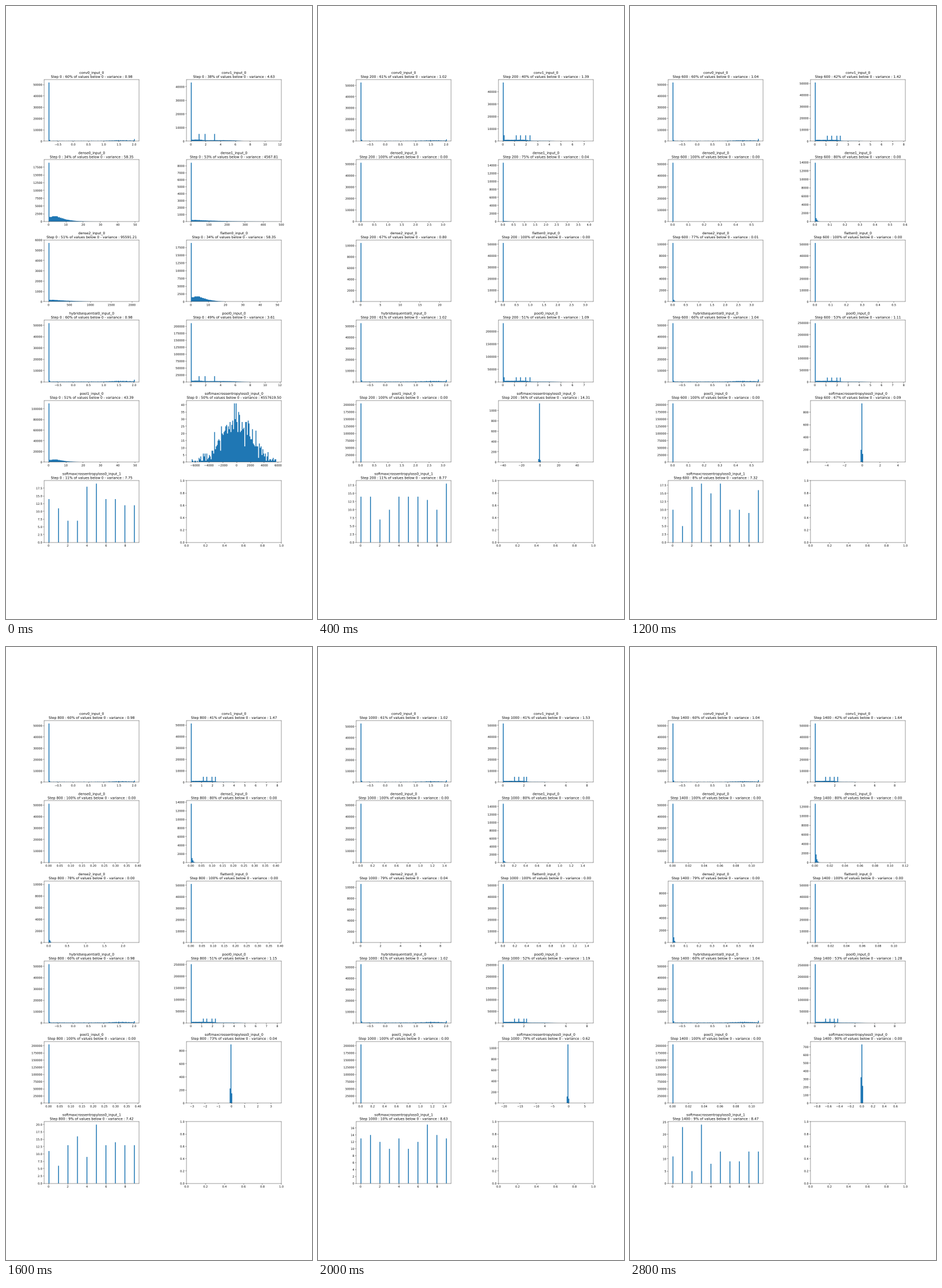
Recreate the animation shown at these times as a matplotlib script. Size 529x1058 px, loop 3 s.

```python
import numpy as np
import matplotlib.pyplot as plt
from matplotlib.animation import FuncAnimation
from matplotlib.patheffects import Normal

plt.rcParams["text.hinting"] = "none"
plt.rcParams["font.family"] = "DejaVu Sans"

BLUE = "#1f77b4"
BINS = 100
K = np.arange(BINS)

# Key points of the widely jumping axis limits
KEYS = [0, 200, 400, 800, 1000, 1200, 1400]
SCALE = [49.8, 3.14, .772, .386, 1.44, 1.005, .109]
LOSS_LOW = [6597, 40.1, 9.14, 3.08, 20.34, 9.67, .839]
LOSS_HIGH = [5853, 52.9, 5.46, 3.46, 6.3, 4.55, .70]


def key(step, row):
    """Geometric interpolation between key points."""
    return float(np.exp(np.interp(step, KEYS, np.log(row))))


def fall(step, start, end, tau=55):
    """Exponential approach from start to end."""
    return end + (start - end) * np.exp(-step / tau)


def wave(step, cos, sin, cos2=0.0):
    """Slow wobble from batch to batch."""
    t = 2 * np.pi * step / 800
    return cos * np.cos(t) + sin * np.sin(t) + cos2 * np.cos(2 * t)


def jitter(step, amount):
    return np.random.default_rng(step).uniform(1 - amount, 1 + amount, BINS)


def spread(peak, total, weight):
    """First bar holds the peak, the other values follow the weights."""
    weight[0] = 0
    h = (total - peak) * weight / weight.sum()
    h[0] = peak
    return h


def pixels(step):
    """Grey levels of normalised images: two or three levels share a bin."""
    lo, hi = -.8102, 2.0227
    pct = 59.5 + wave(step, 1.5, .5, -1)
    var = 1.027 + wave(step, -.05, -.01)
    peak = 51500 + 800 * (pct - 59.5)
    levels, _ = np.histogram(np.linspace(0, 1, 256), BINS)
    x = lo + (K + .5) * (hi - lo) / BINS
    weight = (1 + 1.3 * np.exp(-((x - 1.55) / .45) ** 2)) * levels
    weight *= jitter(step, .2)
    weight[[1, -1]] *= 3
    return lo, hi, spread(peak, 100352, weight), pct, var


def features(step):
    """Convolution output: two plateaus and a few constant-valued spikes."""
    hi = fall(step, 11.62, 7.1 + .0011 * step)
    pct = fall(step, 39.4, 41.9, 200) + wave(step, -1.2, -.6)
    var = fall(step, 4.63, 1.25 + .00028 * step)
    x = (K + .5) * hi / BINS

    def plateau(edge, soft):
        return 1 / (1 + np.exp((x - edge) / soft))

    share = fall(step, .35, .7)
    h = (share * plateau(fall(step, 1.55, 2.25), .1)
         + (1 - share) * plateau(fall(step, 6.5, 4.6), fall(step, .6, .3)))
    h *= 1200 * jitter(step, .07)
    for start, end in ((1.11, 1.12), (1.89, 1.5), (1.89, 1.98), (3.22, 2.28)):
        h[int(fall(step, start, end) / hi * BINS)] = fall(step, 5400, 4800)
    h[1] += 4000 * np.exp(-((step - 300) / 180) ** 4)
    h[0] = fall(step, 43150, 52000, 300)
    return 0, hi, h, pct, var


def pooled(conv):
    lo, hi, h, pct, var = conv
    h = h * 3.85
    h[0] *= 4.9 / 3.85
    return lo, hi, h, 49 + .8 * (pct - 38), .78 * var


def hump(step, mid, width):
    d = K - mid
    w = width * np.where(d < 0, 3, 1)
    return np.exp(-(np.abs(d) / w) ** 1.3) * jitter(step, .07)


def collapsing(step, pct, var, peak, total):
    """Activations that die out almost completely."""
    h = spread(fall(step, peak, total, 30), total, hump(step, 8, 13))
    return 0, key(step, SCALE), h, fall(step, pct, 100, 30), fall(step, var, 0, 20)


def dense(step, reach, pct, var, peak, total, width):
    """Activations that shrink towards zero; each argument is a rule's value."""
    h = spread(peak, total, hump(step, 1, width))
    return 0, reach * key(step, SCALE), h, pct, var


def dense1(step):
    s = np.log(key(step, SCALE))
    return dense(step, fall(step, 9.57, 1.05), fall(step, 53, 80, 120),
                 fall(step, 4567.81, 0, 17),
                 fall(step, 8450, min(14800, 14400 + 800 * s)),
                 15360, fall(step, 32, 1.2, 100))


def dense2(step):
    s = key(step, SCALE)
    return dense(step, fall(step, 41.5, 6), fall(step, 51, 79, 230),
                 fall(step, 95591.21, .02 * s * s, 16.7),
                 fall(step, 5715, min(10600, 10500 + 450 * np.log(s))),
                 10752, fall(step, 28, 1, 100))


def logits(step):
    """A wide bell that turns into a spike next to zero."""
    lo, hi = -key(step, LOSS_LOW), key(step, LOSS_HIGH)
    s = key(step, SCALE)
    early = fall(step, 1, 0)
    rng = np.random.default_rng(4)
    sample = rng.normal(0, (hi - lo) / 5.83, int(1280 * early))
    h, _ = np.histogram(sample, BINS, (lo, hi))
    peak = 1020 + 130 * np.log(s)
    main = round(-lo / (hi - lo) * BINS) - 1
    sides = np.array([.6 * (1270 - peak), peak, .4 * (1270 - peak)])
    h = h.astype(float)
    h[main - 1:main + 2] += (1 - early) * sides
    return lo, hi, h, 50 + step / 35, fall(step, 4557619.50, .3 * s * s, 15.5)


def labels(step):
    """Class counts of one random batch."""
    n = np.random.default_rng(step).multinomial(128, [.1] * 10)
    digit = np.arange(10)
    h = np.zeros(BINS)
    h[digit * 11] = n
    return 0, 9, h, n[0] / 1.28, np.repeat(digit, n).var()


def panels(step):
    conv0, conv1 = pixels(step), features(step)
    dense0 = collapsing(step, 34, 58.35, 18950, 51200)
    return {
        "conv0_input_0": conv0,
        "conv1_input_0": conv1,
        "dense0_input_0": dense0,
        "dense1_input_0": dense1(step),
        "dense2_input_0": dense2(step),
        "flatten0_input_0": dense0,
        "hybridsequential0_input_0": conv0,
        "pool0_input_0": pooled(conv1),
        "pool1_input_0": collapsing(step, 51, 43.39, 110250, 204800),
        "softmaxcrossentropyloss0_input_0": logits(step),
        "softmaxcrossentropyloss0_input_1": labels(step),
    }


def smooth_text(ax):
    """Draw text as outlines so that it is placed between pixels."""
    for text in (ax.title, *ax.get_xticklabels(), *ax.get_yticklabels()):
        text.set_path_effects([Normal()])


fig, grid = plt.subplots(6, 2, figsize=(15, 30), dpi=529 / 15)
fig.subplots_adjust(left=.125, right=.9, bottom=.125, top=.88, wspace=.5, hspace=.3)
axes = grid.ravel()
smooth_text(axes[-1])


def draw(frame):
    step = frame * 100
    for ax, (name, panel) in zip(axes, panels(step).items()):
        lo, hi, h, pct, var = panel
        ax.clear()
        ax.stairs(h, np.linspace(lo, hi, BINS + 1), fill=True, color=BLUE,
                  lw=0, snap=False)
        pad = .05 * (hi - lo)
        ax.set_xlim(lo - pad, hi + pad)
        ax.set_ylim(0, 1.05 * h.max())
        ax.set_title(f"{name}\nStep {step} : {pct:.0f}% of values below 0"
                     f" - variance : {var:.2f}")
        smooth_text(ax)
    return []


anim = FuncAnimation(fig, draw, frames=15, interval=200, repeat=True,
                     repeat_delay=0, blit=False)
plt.show()
```
